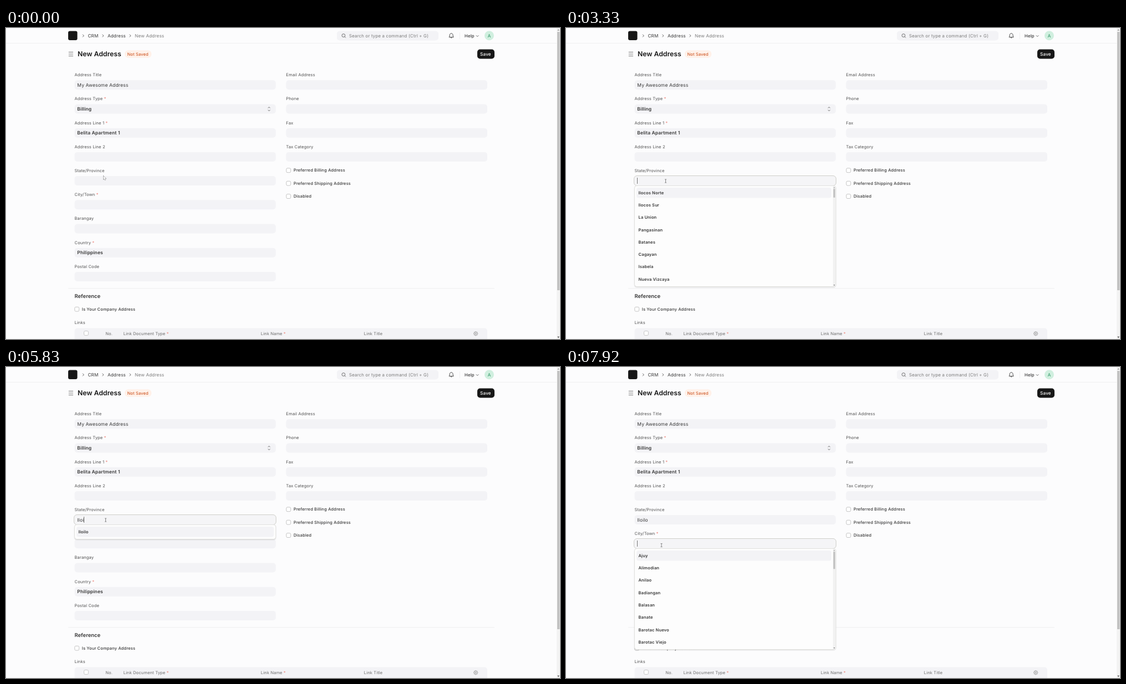
Write an HTML page with a canvas that moves like this. It is 998 px wide and 561 px high and loops after 8000 ms.

```html
<!DOCTYPE html>
<html lang="en">
<head>
<meta charset="utf-8">
<title>New Address</title>
<style>
html, body { margin: 0; width: 100%; height: 100%; overflow: hidden; background: #fcfcfd; }
canvas { display: block; width: 998px; height: 561px; }
</style>
</head>
<body>
<canvas id="stage" width="998" height="561"></canvas>
<script>
const ctx = document.getElementById('stage').getContext('2d');
ctx.textRendering = 'geometricPrecision';
const LOOP = 8000, TICK = 1000 / 12;
const BG = '#fcfcfd', FIELD = '#f3f3f6', INK = '#383838', LABEL = '#525252', MUTED = '#7c7c7c', LINE = '#efeff0';
const PITCH = 43.2, ROW = 22.27;

const PROVINCES = ['Ilocos Norte', 'Ilocos Sur', 'La Union', 'Pangasinan', 'Batanes', 'Cagayan', 'Isabela', 'Nueva Vizcaya'];
const WITH_I = ['Ilocos Norte', 'Ilocos Sur', 'La Union', 'Pangasinan', 'Isabela', 'Nueva Vizcaya', 'Quirino', 'Nueva Ecija'];
const WITH_IL = ['Ilocos Norte', 'Ilocos Sur', 'Iloilo', 'Biliran', 'Metro Manila', 'City of Manila', 'Manila'];
const WITH_ILO = ['Ilocos Norte', 'Ilocos Sur', 'Iloilo'];
const TOWNS = ['Ajuy', 'Alimodian', 'Anilao', 'Badiangan', 'Balasan', 'Banate', 'Barotac Nuevo', 'Barotac Viejo'];

// focus: form row with the caret; thumb: scrollbar thumb height, 0 for none
const STEPS = [
  { at: 0, focus: -1, state: '', list: [], thumb: 0 },
  { at: 1330, focus: 4, state: '', list: PROVINCES, thumb: 15.5 },
  { at: 4000, focus: 4, state: 'I', list: WITH_I, thumb: 30 },
  { at: 4250, focus: 4, state: 'Il', list: WITH_IL, thumb: 0 },
  { at: 4500, focus: 4, state: 'Ilo', list: WITH_ILO, thumb: 0 },
  { at: 4750, focus: 4, state: 'Iloi', list: ['Iloilo'], thumb: 0 },
  { at: 6420, focus: 4, state: 'Iloilo', list: [], thumb: 0 },
  { at: 6920, focus: 5, state: 'Iloilo', list: TOWNS, thumb: 31 }
];
const CARET_OFF = [[1750, 2250], [2830, 3330], [3830, 4000], [5330, 5830], [7420, 7920]];
const POINTER = [
  [0, 175.5, 266.5], [330, 179.5, 275.6], [500, 179.5, 276], [5830, 179.5, 276],
  [6330, 176, 298], [6580, 175, 299], [6750, 172, 321.5], [LOOP, 172, 321.5]
];

function box(x, y, w, h, r, fill, stroke) {
  ctx.beginPath();
  ctx.roundRect(x, y, w, h, r);
  if (fill) { ctx.fillStyle = fill; ctx.fill(); }
  if (stroke) { ctx.strokeStyle = stroke; ctx.lineWidth = 1; ctx.stroke(); }
}

function path(points, color, width = 1, closed = false) {
  ctx.beginPath();
  for (let i = 0; i < points.length; i += 2) ctx.lineTo(points[i], points[i + 1]);
  if (closed) ctx.closePath();
  ctx.strokeStyle = color;
  ctx.lineWidth = width;
  ctx.stroke();
}

function circle(x, y, r, fill, stroke) {
  ctx.beginPath();
  ctx.arc(x, y, r, 0, Math.PI * 2);
  if (fill) { ctx.fillStyle = fill; ctx.fill(); }
  if (stroke) { ctx.strokeStyle = stroke; ctx.lineWidth = 0.8; ctx.stroke(); }
}

function triangle(x, y, size, dir, color) {
  ctx.beginPath();
  ctx.moveTo(x, y - size * dir);
  ctx.lineTo(x + size, y + size * dir * 0.6);
  ctx.lineTo(x - size, y + size * dir * 0.6);
  ctx.fillStyle = color;
  ctx.fill();
}

// Draws text vertically centred on its capitals and returns its width.
function text(str, x, cy, size = 7.5, color = LABEL, weight = 400, spacing = 0.02) {
  ctx.font = `${weight} ${size}px Inter, "Liberation Sans", sans-serif`;
  ctx.letterSpacing = `${size * spacing}px`;
  ctx.fillStyle = color;
  ctx.fillText(str, x, cy + size * 0.364);
  return ctx.measureText(str).width;
}

function label(str, x, cy, color = LABEL, required = false) {
  const w = text(str, x, cy, 7.5, color);
  if (required) text('*', x + w + 2.2, cy, 7.5, '#ec7d73');
}

function checkbox(x, cy, str) {
  box(x + 0.5, cy - 3.9, 7.8, 7.8, 2, '#fff', '#c4c4c4');
  if (str) text(str, x + 13.5, cy - 0.3, 7.5, INK, 500);
}

const rowY = i => 102.8 + PITCH * i;

function field(x, i, name, { value = '', bold = false, required = false } = {}) {
  label(name, x, rowY(i) - 18.4, LABEL, required);
  box(x, rowY(i) - 8.5, 362.5, 17, 5, FIELD);
  if (value) text(value, x + 4.8, rowY(i) + 0.1, 8.45, INK, bold ? 600 : 400);
}

function header() {
  path([0, 27.5, 992, 27.5], LINE);
  box(112, 5.5, 16.5, 16.5, 3, '#171717');
  for (const x of [138, 173.5, 222.5]) path([x, 11.7, x + 2.3, 14, x, 16.3], '#525252', 0.9);
  text('CRM', 147.5, 14, 8.1, INK);
  text('Address', 183, 14, 8.1, INK);
  text('New Address', 232, 14, 8.1, MUTED);

  box(596, 5.5, 183, 17, 5, FIELD);
  circle(608, 13.5, 2.9, null, '#525252');
  path([610.1, 15.6, 612, 17.5], '#525252', 0.9);
  text('Search or type a command (Ctrl + G)', 618, 14, 7.9, MUTED);

  ctx.beginPath();
  ctx.moveTo(798.2, 16.5);
  ctx.quadraticCurveTo(799.3, 15.5, 799.3, 13);
  ctx.bezierCurveTo(799.3, 8.6, 805.1, 8.6, 805.1, 13);
  ctx.quadraticCurveTo(805.1, 15.5, 806.2, 16.5);
  ctx.closePath();
  ctx.moveTo(801, 17.4);
  ctx.quadraticCurveTo(802.2, 19, 803.4, 17.4);
  ctx.strokeStyle = INK;
  ctx.lineWidth = 0.9;
  ctx.stroke();

  path([817.5, 8, 817.5, 20], LINE);
  text('Help', 826, 14, 7.8, INK, 500);
  path([847, 13.3, 849.2, 15.5, 851.4, 13.3], '#525252', 0.9);
  circle(870.5, 13.8, 8.5, '#d0efdf');
  text('A', 867.7, 14, 8, '#278f5e');
}

function titleBar() {
  for (const y of [43.5, 47, 50.5]) path([112.8, y, 121, y], '#6a6a6a', 0.9);
  text('New Address', 129, 46.8, 12.2, '#171717', 600, 0);
  box(214, 40.3, 48, 13.4, 6, '#fff1e9');
  text('Not Saved', 218.5, 47, 7.5, '#c8450f');
  box(849, 38.5, 31, 17, 5, '#171717');
  text('Save', 854, 46.9, 8.2, '#fff', 500);
}

function form(state) {
  const L = 123.5, R = 504.5;
  field(L, 0, 'Address Title', { value: 'My Awesome Address' });
  field(L, 1, 'Address Type', { value: 'Billing', bold: true, required: true });
  path([472, 144.5, 473.9, 142.6, 475.8, 144.5], '#525252', 0.9);
  path([472, 147.7, 473.9, 149.6, 475.8, 147.7], '#525252', 0.9);
  field(L, 2, 'Address Line 1', { value: 'Belita Apartment 1', bold: true, required: true });
  field(L, 3, 'Address Line 2');
  field(L, 4, 'State/Province', { value: state });
  field(L, 5, 'City/Town', { required: true });
  field(L, 6, 'Barangay');
  field(L, 7, 'Country', { value: 'Philippines', bold: true, required: true });
  field(L, 8, 'Postal Code');
  ['Email Address', 'Phone', 'Fax', 'Tax Category'].forEach((name, i) => field(R, i, name));
  checkbox(R, 256.8, 'Preferred Billing Address');
  checkbox(R, 280.2, 'Preferred Shipping Address');
  checkbox(R, 303.6, 'Disabled');
}

function references() {
  path([112, 469.8, 880, 469.8], LINE);
  text('Reference', 123.5, 483.8, 9.45, INK, 600, 0);
  checkbox(123.3, 507.2, 'Is Your Company Address');
  label('Links', 123.5, 531.2);
  box(123.5, 541.5, 743.5, 30, 5, FIELD);
  checkbox(140, 550.5);
  label('No.', 179.3, 550.8, '#6b6b6b');
  label('Link Document Type', 211.5, 550.8, '#6b6b6b', true);
  label('Link Name', 459, 550.8, '#6b6b6b', true);
  label('Link Title', 644.8, 550.8, '#6b6b6b');
  circle(846.2, 551.3, 1.2, null, '#8a8a8a');
  circle(846.2, 551.3, 3.2, null, '#8a8a8a');
  for (let i = 0; i < 8; i++) {
    const c = Math.cos(i * Math.PI / 4), s = Math.sin(i * Math.PI / 4);
    path([846.2 + 3.3 * c, 551.3 + 3.3 * s, 846.2 + 4.1 * c, 551.3 + 4.1 * s], '#8a8a8a', 0.9);
  }
}

function pageScroll() {
  box(992, 0, 6, 561, 0, '#f3f3f3');
  box(993, 7, 4.4, 466, 0, '#c1c1c1');
  triangle(995.1, 3.6, 1.9, 1, '#a3a3a3');
  triangle(995.1, 557.6, 1.9, -1, '#606060');
}

function focusField(row, value, caretOn) {
  const y = rowY(row);
  box(122.5, Math.round(y - 9.4) + 0.5, 364, 18, 5.5, '#f5f5f7', '#cfcfca');
  const w = value ? text(value, 128.3, y + 0.1, 8.45, INK) : 0;
  if (caretOn) box(Math.round(128 + w), Math.round(y - 5.4), 1, 11, 0, '#777');
}

function dropdown(row, list, thumb) {
  if (!list.length) return;
  const top = Math.round(rowY(row) + 9.4) - 0.5, h = Math.round(3.9 + ROW * list.length);
  ctx.save();
  ctx.shadowColor = 'rgba(0,0,0,0.2)';
  ctx.shadowBlur = 2;
  ctx.shadowOffsetY = 1;
  box(123.5, top, 362.5, h, 4, '#fdfdfd');
  ctx.restore();
  box(123.5, top, 362.5, h, 4, null, '#e2e2df');
  box(127, top + 3.5, thumb ? 351 : 355.5, 18.6, 4, FIELD);
  list.forEach((name, i) => text(name, 130.5, rowY(row) + 21.4 + ROW * i, 7.5, INK, 600));
  if (!thumb) return;
  box(481, top + 0.6, 4.4, h - 1.2, 1, '#f1f1f1');
  box(481.6, top + 5.8, 3.2, thumb, 0, '#c1c1c1');
  triangle(483.2, top + 3.4, 1.3, 1, '#a3a3a3');
  triangle(483.2, top + h - 2.8, 1.3, -1, '#707070');
}

function pointerAt(t) {
  const q = Math.floor((t + 4) / TICK) * TICK;
  const i = Math.max(1, POINTER.findIndex(p => p[0] > q));
  const [t0, x0, y0] = POINTER[i - 1], [t1, x1, y1] = POINTER[i];
  const k = Math.min(1, (q - t0) / (t1 - t0)), e = k * k * (3 - 2 * k);
  return [x0 + (x1 - x0) * e, y0 + (y1 - y0) * e];
}

function pointer(t) {
  const [x, y] = pointerAt(t);
  const overField = [4, 5].some(i => Math.abs(y - rowY(i)) < 8.5);
  const overList = t >= 5830 && t < 6420 && y > 285;
  if (overField && !overList) {
    path([x, y - 3, x, y + 3], '#777', 0.9);
    for (const dy of [-3, 3]) path([x - 1.6, y + dy, x + 1.6, y + dy], '#777', 0.8);
    return;
  }
  const shape = [0, 0, 0, 6.8, 1.6, 5.4, 2.7, 7.9, 3.8, 7.4, 2.8, 5, 4.8, 4.8]
    .map((v, i) => v + (i % 2 ? y : x));
  path(shape, '#555', 0.9, true);
  ctx.fillStyle = '#fff';
  ctx.fill();
}

function draw(t) {
  const step = STEPS.filter(s => s.at <= t).pop();
  ctx.fillStyle = BG;
  ctx.fillRect(0, 0, 998, 561);
  header();
  titleBar();
  form(step.focus === 4 ? '' : step.state);
  references();
  pageScroll();
  if (step.focus >= 0) {
    const caretOn = !CARET_OFF.some(([a, b]) => t >= a && t < b);
    focusField(step.focus, step.focus === 4 ? step.state : '', caretOn);
    dropdown(step.focus, step.list, step.thumb);
  }
  pointer(t);
}

const start = performance.now();
function frame() {
  draw((performance.now() - start) % LOOP);
  requestAnimationFrame(frame);
}
frame();
</script>
</body>
</html>
```
